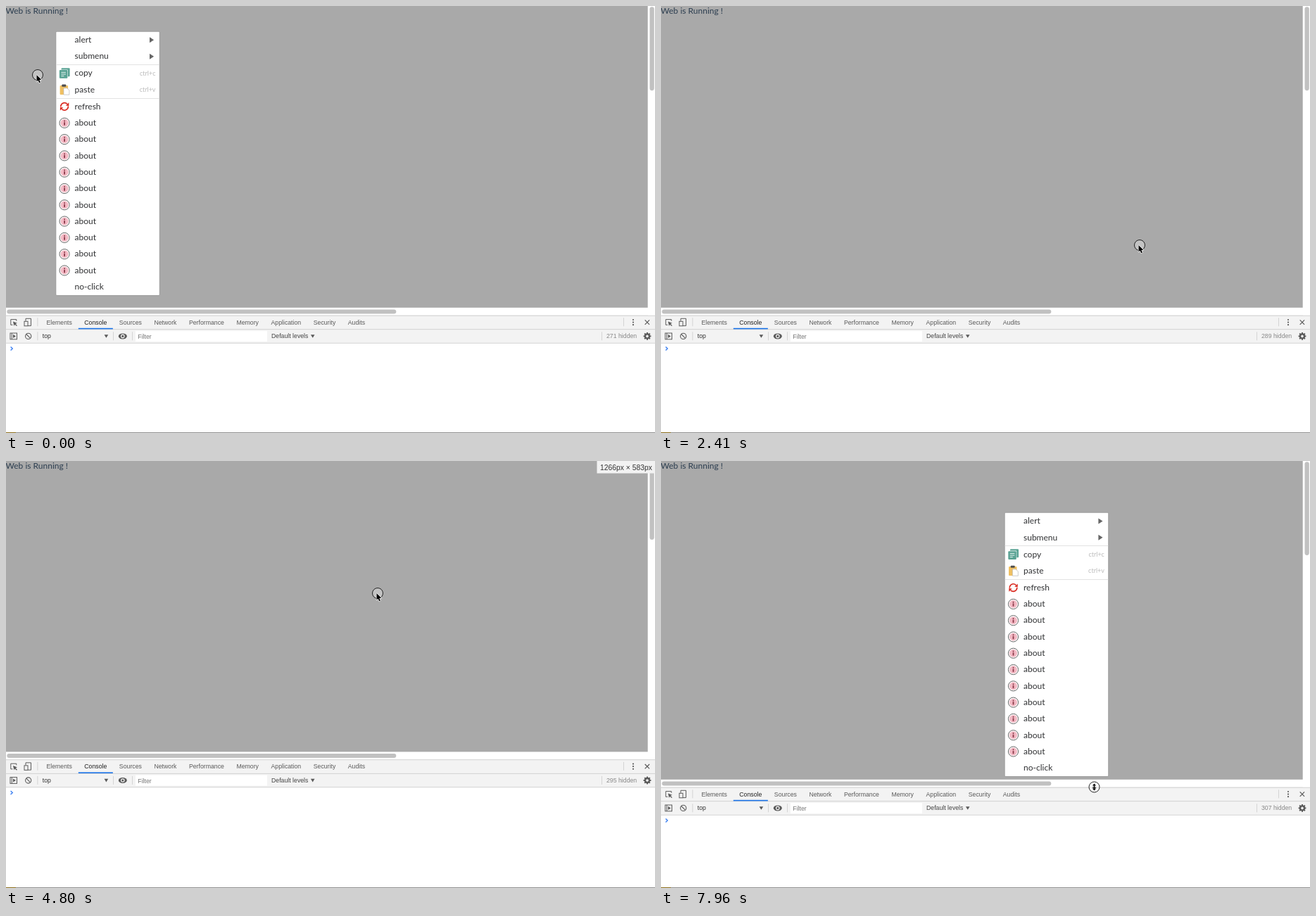
Animation of 922 by 607 pixels, one loop 8 s. Source, as an HTML page with a canvas:

```html
<!DOCTYPE html>
<html lang="en">
<head>
<meta charset="utf-8">
<title>Context menu</title>
<style>
html, body { margin: 0; width: 100%; height: 100%; overflow: hidden; background: #fff; }
canvas { display: block; }
</style>
</head>
<body>
<canvas id="stage" width="922" height="607"></canvas>
<script>
const W = 922, H = 607, LOOP = 8000;
const ctx = document.getElementById('stage').getContext('2d');
const MENU_FONT = '12px Lato, sans-serif';
const TOOL_FONT = '8.74px "Liberation Sans", Arial, sans-serif';
const LABEL_FONT = '10.35px "Liberation Sans", Arial, sans-serif';
const INK = '#5a5a5a';

// Pointer gestures: start, end, then the point reached.
const moves = [
  [-300, 0, 45, 98], [150, 330, 49.5, 98], [780, 1070, 696, 93], [1810, 2110, 680, 340],
  [2410, 2990, 696, 93], [3150, 4180, 651, 427], [4780, 4800, 528, 188], [5250, 6130, 582, 425],
  [6280, 6570, 581.5, 464], [6720, 7220, 489.4, 190], [7370, 7960, 615.5, 463.5]
];
// When each menu opens (at the pointer) and closes.
const menus = [[-300, 150], [630, 780], [780, 1370], [1810, 2410], [2990, 4470], [5100, 6270], [7370, LOOP]];
// The two drags of the divider: start, end.
const dragUp = [4270, 4630], dragDown = [6280, 6600];
const PAGE_LAG = 220, LABEL_DELAY = 100, LABEL_HOLD = 1000;

const mix = (a, b, k) => a + (b - a) * k;
function ease(t, from, to) {
  const u = Math.min(1, Math.max(0, (t - from) / (to - from)));
  return u * u * (3 - 2 * u);
}

function pointerAt(t) {
  let x = 72, y = 36.7;
  for (const [from, to, toX, toY] of moves) {
    const k = ease(t, from, to);
    x = mix(x, toX, k);
    y = mix(y, toY, k);
  }
  return [x, y];
}

// Height of the divider; the page repaints later than the panel when it grows.
function dividerAt(t, lag = 0) {
  const raised = mix(439.8, 424.4, ease(t, ...dragUp));
  return mix(raised, 463.8, ease(t, dragDown[0], dragDown[1] + lag));
}
const pageAt = t => dividerAt(t, PAGE_LAG);

function box(x, y, w, h, color) {
  ctx.fillStyle = color;
  ctx.fillRect(x, y, w, h);
}
function pill(x, y, w, h, r, color) {
  ctx.fillStyle = color;
  ctx.beginPath();
  ctx.roundRect(x, y, w, h, r);
  ctx.fill();
}
function write(text, x, y, font, color, align = 'left') {
  ctx.font = font;
  ctx.fillStyle = color;
  ctx.textAlign = align;
  ctx.fillText(text, x, y);
}
function trace(points) {
  ctx.beginPath();
  points.forEach(([x, y]) => ctx.lineTo(x, y));
}
function poly(points, color) {
  ctx.fillStyle = color;
  trace(points);
  ctx.fill();
}
function line(points, color, width = 1) {
  ctx.strokeStyle = color;
  ctx.lineWidth = width;
  trace(points);
  ctx.stroke();
}
function arc(x, y, r, color, width = 1, from = 0, to = Math.PI * 2) {
  ctx.strokeStyle = color;
  ctx.lineWidth = width;
  ctx.beginPath();
  ctx.arc(x, y, r, from, to);
  ctx.stroke();
}
function disc(x, y, r, color, squash = 1) {
  ctx.fillStyle = color;
  ctx.beginPath();
  ctx.ellipse(x, y, r, r * squash, 0, 0, Math.PI * 2);
  ctx.fill();
}
function at(x, y, draw) {
  ctx.save();
  ctx.translate(x, y);
  draw();
  ctx.restore();
}
const rightArrow = (x, y, w, h, color) => poly([[x, y - h], [x + w, y], [x, y + h]], color);
const downArrow = (x, y) => poly([[x - 2.8, y - 2.3], [x + 2.8, y - 2.3], [x, y + 2.3]], INK);

const icons = {
  copy() {
    pill(-4.5, -7.5, 12, 12, 1, '#5aa394');
    pill(-7.6, -5.2, 12.4, 12.4, 1, '#fff');
    pill(-7.2, -4.6, 11.5, 11.8, 1, '#5aa394');
    for (let i = 0; i < 3; i++) box(-4.7, -1.8 + i * 2.6, i < 2 ? 6.5 : 4, 1, '#e4f1ee');
  },
  paste() {
    pill(-6.5, -6, 11.5, 13, 1, '#f0c061');
    pill(-3.8, -7.4, 6, 3.2, 1, '#4d4d4d');
    const sheet = [[-1.2, 7.2], [-1.2, -2.2], [3.6, -2.2], [6.8, 1], [6.8, 7.2]];
    poly(sheet, '#fff');
    line([...sheet, sheet[0]], '#aaa', 0.6);
  },
  refresh() {
    for (let i = 0; i < 2; i++) {
      ctx.rotate(Math.PI);
      arc(0, 0, 5.3, '#d9261c', 1.7, Math.PI * 0.97, Math.PI * 1.75);
      poly([[6.2, -5.6], [6.2, -1], [1.8, -1.4]], '#d9261c');
    }
  },
  about() {
    disc(0, 0, 7.3, '#fff');
    arc(0, 0, 7.1, '#666');
    disc(0, 0, 5.5, '#f3b9c4');
    disc(0, -2.7, 1, '#8b3a4a');
    box(-0.9, -1, 1.8, 4.3, '#8b3a4a');
  }
};

const rows = ['alert', 'submenu', 'copy', 'paste', 'refresh', ...Array(10).fill('about'), 'no-click'];
const hints = { copy: 'ctrl+c', paste: 'ctrl+v' };

function drawMenu(x, y) {
  const pitch = 23.3, width = 146.5;
  ctx.save();
  ctx.shadowColor = 'rgba(0,0,0,.18)';
  ctx.shadowBlur = 2;
  pill(x, y, width, 374.2, 1, '#fff');
  ctx.restore();
  rows.forEach((name, i) => {
    const separators = Math.min(2, Math.floor(i / 2));
    const cy = y + pitch * (i + 0.5) + separators * 0.7;
    if (i === 2 || i === 4) box(x, Math.round(cy - pitch / 2 - 0.8), width, 1, '#e2e2e2');
    write(name, x + 26.3, cy + 3.8, MENU_FONT, '#303133');
    if (icons[name]) at(x + 11.8, cy, icons[name]);
    if (i < 2) rightArrow(x + 132.7, cy, 6.1, 4, '#666');
    if (hints[name]) write(hints[name], x + 141.2, cy + 3, '9px Lato, sans-serif', '#bbb', 'right');
  });
}

function drawPage(bottom) {
  const view = bottom - 11;
  box(0, 0, W, H, '#fff');
  box(0, 0, 911.7, view, '#a9a9a9');
  write('Web is Running !', -0.5, 11, MENU_FONT, '#2c3e50');
  pill(914.5, 1.2, 6.3, 119 * (view / 428.8) ** 2, 3.1, '#c1c1c1');
  pill(1.3, view + 2.6, 553, 6, 3, '#c1c1c1');
  box(0, bottom - 0.5, 912, 0.8, '#e8e8e8');
}

const tabs = ['Elements', 'Console', 'Sources', 'Network', 'Performance', 'Memory', 'Application', 'Security', 'Audits'];

function drawTabs() {
  let x = 57.4;
  for (const name of tabs) {
    const active = name === 'Console';
    write(name, x, 12.9, TOOL_FONT, active ? '#222' : INK);
    const { width } = ctx.measureText(name);
    if (active) box(x - 8.5, 18, width + 17, 1.6, '#1a73e8');
    x += width + 17.5;
  }
}

function drawPanelIcons() {
  line([[9.5, 13.5], [6.8, 13.5], [6.8, 5.8], [14.8, 5.8], [14.8, 8]], INK);
  poly([[10, 8.7], [16, 11], [13.6, 12], [16, 14.4], [15, 15.3], [12.6, 13], [11.5, 15.2]], INK);
  line([[28, 8], [28, 4.5], [35.5, 4.5], [35.5, 14.8], [31, 14.8]], INK);
  ctx.strokeRect(26, 8.5, 5, 6.5);
  for (let i = -1; i < 2; i++) disc(891, 9.8 + i * 3.6, 1.1, INK);
  for (const side of [-1, 1]) line([[910.9 - 3.2 * side, 6.6], [910.9 + 3.2 * side, 13]], INK, 1.2);

  ctx.lineWidth = 1;
  ctx.strokeRect(6, 25.2, 9.5, 8.8);
  line([[8.3, 25.2], [8.3, 34]], INK);
  rightArrow(10, 29.6, 4, 2.6, INK);
  arc(31.7, 29.6, 4.1, INK, 1.1);
  line([[28.8, 26.7], [34.6, 32.5]], INK, 1.1);
  disc(165.8, 29.6, 6, INK, 0.67);
  disc(165.8, 29.6, 2.8, '#f3f3f3');
  disc(165.8, 29.6, 1.6, INK);
  at(911, 29.6, () => {
    arc(0, 0, 3, INK, 2.4);
    for (let i = 0; i < 8; i++) {
      ctx.rotate(Math.PI / 4);
      box(-1, -5.4, 2, 2, INK);
    }
  });
}

function drawTools(top, count, caret) {
  at(0, top, () => {
    box(0, 0, W, H, '#fff');
    box(0, 0, W, 39.6, '#f3f3f3');
    for (let i = 0; i < 3; i++) box(0, i * 19.5, W, 0.8, '#cacaca');
    for (const x of [44.5, 877]) box(x, 3.5, 0.8, 12, '#ccc');
    for (const x of [44.5, 152, 179, 846]) box(x, 23.5, 0.8, 12, '#ccc');
    drawTabs();
    drawPanelIcons();

    write('top', 51.7, 32.5, TOOL_FONT, '#333');
    downArrow(142.4, 29.7);
    box(184, 22.2, 187, 15, '#fff');
    write('Filter', 187.3, 33.2, TOOL_FONT, '#757575');
    write('Default levels', 377, 32.5, TOOL_FONT, '#444');
    downArrow(435.7, 29.7);
    write(count + ' hidden', 853, 32.5, TOOL_FONT, '#888');

    line([[6.6, 44.6], [9.3, 47.1], [6.6, 49.6]], '#367cf1', 1.3);
    if (caret) box(16.4, 41.3, 1.2, 10.4, '#222');
  });
  box(0, 606, W, 1, '#8f8f8f');
  box(0, 606, 14, 1, '#8a6d1a');
}

function drawLabel(bottom) {
  box(839.5, 0, W - 839.5, 17.5, '#f2f2f2');
  const height = Math.round(bottom * 1266 / W);
  write(`1266px × ${height}px`, 844, 12.6, LABEL_FONT, '#333');
}

function drawResizeArrow() {
  line([[0, -3], [0, 3]], '#000', 1.4);
  line([[-2.6, 0.6], [2.6, 0.6]], '#000');
  for (const side of [-1, 1]) poly([[-2.6, 2 * side], [0, 5 * side], [2.6, 2 * side]], '#000');
}
function drawArrow() {
  const arrow = [[-1.5, 0], [-1.5, 9.6], [0.6, 7.7], [2.2, 11.2], [3.9, 10.4], [2.4, 7], [5.4, 6.8]];
  ctx.lineJoin = 'round';
  line([...arrow, arrow[0]], '#fff', 1.4);
  poly(arrow, '#000');
}
function drawPointer(x, y, resizing) {
  disc(x, y, 7.5, 'rgba(255,255,255,.3)');
  arc(x, y, 7.5, '#222');
  at(x, y, resizing ? drawResizeArrow : drawArrow);
}

function render(t) {
  const bottom = pageAt(t), top = dividerAt(t);
  const [x, y] = pointerAt(t);
  const opened = menus.filter(([open]) => open <= t);
  const [openTime, closeTime] = opened[opened.length - 1];
  const caret = t > 4200 && t % 1000 >= 250 && t % 1000 < 750;
  const labelled = [dragUp, dragDown].some(([from, to]) => t >= from + LABEL_DELAY && t < to + LABEL_HOLD);

  drawPage(bottom);
  if (t < closeTime) {
    const [menuX, menuY] = pointerAt(openTime);
    drawMenu(menuX - 0.7, Math.min(menuY, pageAt(openTime) - 390));
  }
  drawTools(top, 265 + 6 * opened.length, caret);
  if (labelled) drawLabel(bottom);
  drawPointer(x, y, Math.abs(y - top) < 3);
}

const start = performance.now();
function loop() {
  render((performance.now() - start) % LOOP);
  requestAnimationFrame(loop);
}
loop();
</script>
</body>
</html>
```
